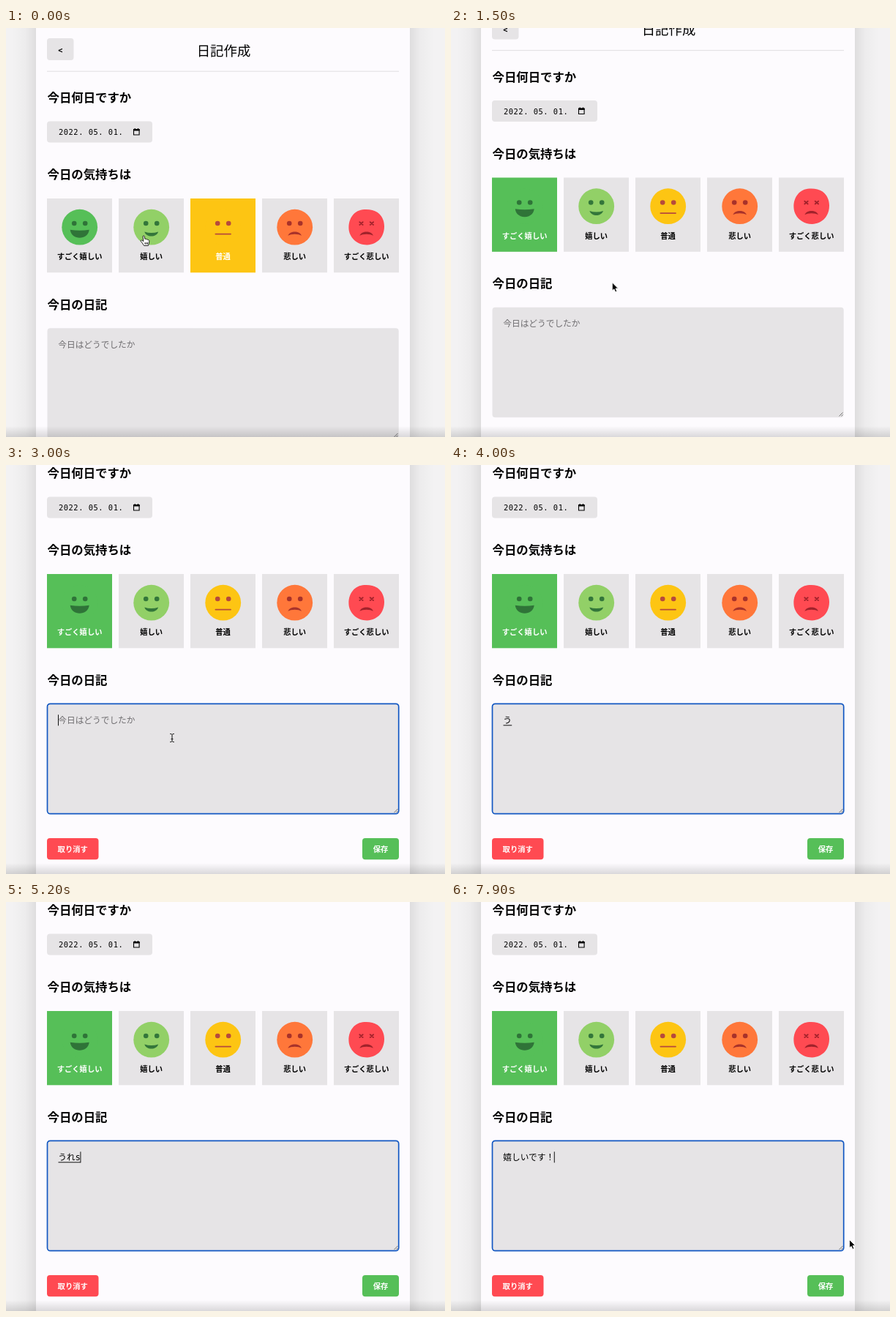
These frames come from a looping animation (600 by 559 pixels, 8 s). An HTML page:

```html
<!DOCTYPE html>
<html lang="ja">
<head>
<meta charset="utf-8">
<title>日記作成</title>
<style>
  html, body { margin: 0; width: 100%; height: 100%; overflow: hidden; background: #f3f2f3; }
  svg { display: block; width: 600px; height: 559px; }
  text { font-family: "Noto Sans CJK JP", "Noto Sans CJK", sans-serif; fill: #000; white-space: pre; }
  .title { font-size: 18.4px; font-weight: 500; text-anchor: middle; }
  .heading { font-size: 16.4px; font-weight: 700; }
  .label { font-size: 10.3px; font-weight: 700; text-anchor: middle; }
  .body { font-size: 11.7px; }
  .mono, #typed { font-family: "DejaVu Sans Mono", "Noto Sans CJK JP", "Noto Sans CJK", monospace; }
  .date { font-size: 10.4px; letter-spacing: .53px; }
  .white, .card.on text { fill: #fff; }
  .card rect, .box { fill: #e6e4e6; }
  .card.on rect { fill: var(--tone); }
  .face { fill: var(--tone); }
  .ink { fill: var(--ink); }
  .stroke { fill: none; stroke: var(--ink); stroke-width: 1.8; stroke-linecap: round; }
</style>
</head>
<body>
<svg viewBox="0 0 600 559">
  <defs>
    <linearGradient id="side">
      <stop offset="0" stop-opacity="0"/>
      <stop offset=".55" stop-opacity=".025"/>
      <stop offset="1" stop-opacity=".085"/>
    </linearGradient>
    <linearGradient id="foot" x2="0" y2="1">
      <stop offset="0" stop-opacity="0"/>
      <stop offset="1" stop-opacity=".14"/>
    </linearGradient>
  </defs>
  <rect width="600" height="559" fill="#f3f2f3"/>
  <rect id="shade" x="8" width="33" height="559" fill="url(#side)"/>
  <use href="#shade" transform="matrix(-1 0 0 1 593 0)"/>
  <rect x="41" width="511" height="559" fill="#fdfbfe"/>

  <g id="page">
    <rect class="box" x="56" y="14" width="36.5" height="30" rx="4"/>
    <text class="label mono" x="74.3" y="34">&lt;</text>
    <text class="title" x="297.5" y="37.7">日記作成</text>
    <path d="M56 59.2H537" stroke="#e0dee1"/>

    <text class="heading" x="56.5" y="101.2">今日何日ですか</text>
    <rect class="box" x="56" y="127.5" width="144" height="29" rx="4"/>
    <text class="mono date" x="72" y="146">2022. 05. 01.</text>
    <path d="M174.5 138.8h7.6v7.2h-7.6z" fill="none" stroke="#000" stroke-width="1.1"/>
    <path d="M174 138h8.6v2.6H174zM175.6 137h1.2v2h-1.2zM179.9 137h1.2v2h-1.2z"/>

    <text class="heading" x="56.5" y="206.2">今日の気持ちは</text>
    <g id="cards"></g>

    <text class="heading" x="56.5" y="383.8">今日の日記</text>
    <rect id="area" class="box" x="56.5" y="410.3" width="480.2" height="150.4" rx="4" stroke-width="1.7"/>
    <path d="M530.5 559l5-5M533.5 559l2-2" stroke="#555" stroke-width=".8"/>
    <text id="hint" class="body" x="71.3" y="436.8" style="fill:#6e6c6f">今日はどうでしたか</text>
    <text id="typed" class="body" x="71.3" y="436.8"></text>
    <path id="underline" stroke="#111" stroke-width="1"/>
    <path id="caret" stroke="#111" stroke-width="1"/>

    <rect x="56" y="594" width="70.5" height="29.3" rx="4" fill="#ff4a52"/>
    <text class="label white" x="91.2" y="612.8">取り消す</text>
    <rect x="487" y="594" width="50" height="29.3" rx="4" fill="#56bf58"/>
    <text class="label white" x="512" y="612.8">保存</text>
  </g>

  <rect y="544" width="600" height="15" fill="url(#foot)"/>

  <g id="pointer">
    <path id="arrow" d="M0 0V11.3L2.6 9L4.4 13L6.4 12.1L4.7 8.2H8.2Z" stroke="#fff" stroke-width=".9"/>
    <path id="hand" d="M-.9 1C-1 -.3 1 -.5 1.2 .9L1.9 4.6C2.6 4 3.7 4.2 4 5C4.8 4.5 5.8 4.8 6 5.7C7 5.3 7.8 6 7.8 7L7.5 10.2L6.4 13.5H.6L-1.8 9.8L-3.8 7.3C-4.2 6.2 -2.9 5.6 -2 6.3L-.2 7.6ZM2.1 9v2.8M4 9v2.8M5.7 9v2.8" fill="#fff" stroke="#111" stroke-width=".9" stroke-linejoin="round"/>
    <path id="beam" d="M-2.8 -5.6Q-.2 -5.6 0 -4.4Q.2 -5.6 2.8 -5.6M0 -4.4V4.4M-2.8 5.6Q-.2 5.6 0 4.4Q.2 5.6 2.8 5.6M-1.4 1.5H1.4" fill="none" stroke="#111"/>
  </g>
</svg>

<script>
const LOOP = 8000, STEP = 100;
const $ = id => document.getElementById(id);

// Faces are drawn around the centre of their circle.
const disc = '<circle class="face" r="24.4"/>';
const blob = '<path class="face" d="M-3 -24.2C4 -24.6 10 -23.6 15 -20.2C21 -16 24.3 -9 24.3 -1C24.3 14 14 24 1 24.2C-13 24.4 -24 14 -24.3 1C-24.5 -13 -16 -23.6 -3 -24.2Z"/>';
const eyes = '<circle class="ink" cx="-7.5" cy="-5.2" r="3.3"/><circle class="ink" cx="7.5" cy="-5.2" r="3.3"/>';
const cross = x => `<path class="stroke" d="M${x - 2.2} -7l4.4 3.8m0 -3.8l-4.4 3.8"/>`;
const mouth = d => `<path class="ink" d="${d}"/>`;
const frown = mouth('M-9.4 11.6C-6.5 4.4 6.5 4.4 9.4 11.6C5 8.8 -5 8.8 -9.4 11.6Z');

const moods = [
  ['すごく嬉しい', '#56bf58', '#2f7438', disc + eyes + mouth('M-13 3.6Q0 5.6 13 3.6C11.5 18.2 -11.5 18.2 -13 3.6Z')],
  ['嬉しい', '#92d067', '#33763a', disc + eyes + mouth('M-9.4 6.4Q0 9.4 9.4 6.4C7 14.4 -7 14.4 -9.4 6.4Z')],
  ['普通', '#fdc513', '#b64a3c', disc + eyes + '<path class="stroke" d="M-10.3 9.4H10.3"/>'],
  ['悲しい', '#ff773a', '#a8322a', disc + eyes + frown],
  ['すごく悲しい', '#ff4a52', '#a1222b', blob + cross(-7.2) + cross(7.2) + frown],
];
$('cards').innerHTML = moods.map(([name, tone, ink, face], i) => `
  <g class="card" style="--tone:${tone};--ink:${ink}" transform="translate(${56 + 98 * i} 233)">
    <rect width="89" height="101.3"/>
    <g transform="translate(44.7 39.2)">${face}</g>
    <text class="label" x="44.6" y="83">${name}</text>
  </g>`).join('');
const cards = [...document.querySelectorAll('.card')];

const selection = [[0, 2], [300, 1], [800, 0]];
const scroll = [[1200, 0], [1300, 3], [1400, 13], [1500, 28.5], [1600, 53], [1700, 74], [1800, 84]];
const moves = [
  [0, 188, 284], [400, 188, 284], [700, 108, 282], [1000, 110, 283],
  [1300, 198, 328], [1500, 220.3, 347.8], [1700, 222, 358], [2000, 227, 373],
  [3100, 227, 373], [7700, 390, 410], [7800, 478, 440], [7900, 544.5, 461.5],
];
const FOCUS = 2000, TYPE = 3100, MOUSE_BACK = 7800;
// time, text, still composing
const typing = [
  [0, '', 0], [TYPE, 'う', 1], [4300, 'うr', 1], [4600, 'うれ', 1], [5100, 'うれs', 1],
  [5400, 'うれし', 1], [5700, 'うれしい', 1], [5900, '嬉しいd', 1], [6000, '嬉しいで', 1],
  [6200, '嬉しいでs', 1], [6300, '嬉しいです', 1], [7000, '嬉しいです', 0],
  [7500, '嬉しいです！', 1], [7600, '嬉しいです！', 0],
];

const current = (table, t) => table.findLast(row => row[0] <= t) || table[0];

function tween(table, t) {
  const next = table.findIndex(row => row[0] > t);
  if (next < 0) return table.at(-1).slice(1);
  if (next === 0) return table[0].slice(1);
  const a = table[next - 1], b = table[next], k = (t - a[0]) / (b[0] - a[0]);
  return a.slice(1).map((v, i) => v + (b[i + 1] - v) * k);
}

const show = (id, on) => $(id).setAttribute('visibility', on ? 'visible' : 'hidden');

function drawEditor(t) {
  const [since, text, composing] = current(typing, t);
  const focused = t >= FOCUS;
  $('area').setAttribute('stroke', focused ? '#1257c2' : 'none');
  $('typed').textContent = text;
  const end = 71.5 + (text ? $('typed').getComputedTextLength() : 0);
  show('hint', !text);
  $('underline').setAttribute('d', `M71.5 439.8H${end}`);
  show('underline', composing);
  $('caret').setAttribute('d', `M${end} 425.3V440.3`);
  show('caret', focused && (t - Math.max(since, FOCUS)) % 1000 < 500);
}

function drawPointer(t, top) {
  const [x, y] = tween(moves, t);
  const pageY = y + top;
  const overCard = pageY > 233 && pageY < 334 && x > 56 && x < 537 && (x - 56) % 98 < 89;
  const overArea = pageY > 410 && pageY < 561 && x > 56 && x < 537;
  const visible = t < TYPE || t >= MOUSE_BACK;
  $('pointer').setAttribute('transform', `translate(${x} ${y})`);
  show('hand', visible && overCard);
  show('beam', visible && overArea);
  show('arrow', visible && !overCard && !overArea);
}

function draw(t) {
  const [top] = tween(scroll, t);
  const picked = current(selection, t)[1];
  $('page').setAttribute('transform', `translate(0 ${-top})`);
  cards.forEach((card, i) => card.classList.toggle('on', i === picked));
  drawEditor(t);
  drawPointer(t, top);
}

const start = performance.now();
function tick() {
  const t = (performance.now() - start) % LOOP;
  draw(Math.floor(t / STEP) * STEP);
  requestAnimationFrame(tick);
}
tick();
</script>
</body>
</html>
```
